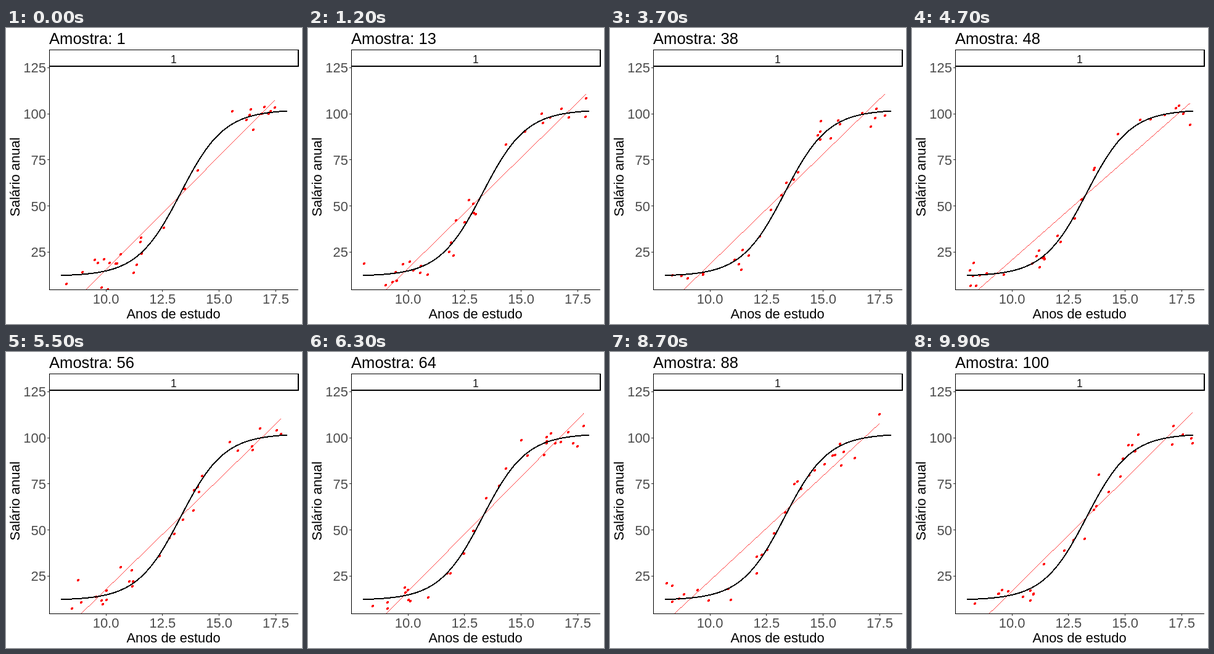
Write an HTML page that moves like this. It is 480 px wide and 480 px high and loops after 10 s.

```html
<!DOCTYPE html>
<html lang="pt">
<head>
<meta charset="utf-8">
<style>
  html, body { margin: 0; width: 100%; height: 100%; overflow: hidden; background: #fff; }
  svg { display: block; width: 100vw; height: 100vh; font-family: "Liberation Sans", Arial, sans-serif; }
  path, circle { shape-rendering: crispEdges; }
</style>
</head>
<body>
<svg viewBox="0 0 480 480">
  <defs><clipPath id="panel"><rect x="70" y="62" width="404" height="362"/></clipPath></defs>
  <text id="title" x="70" y="26" font-size="25.6"></text>
  <g clip-path="url(#panel)">
    <g id="dots" fill="#f00"></g>
    <path id="fit" fill="none" stroke="#f00" stroke-width="0.74"/>
    <path id="curve" fill="none" stroke="#000" stroke-width="2"/>
  </g>
  <path d="M70 35.5H474M70.5 35V424M70 424.5H474" fill="none" stroke="#000"/>
  <path d="M70 62H475M474 35V63" fill="none" stroke="#000" stroke-width="2"/>
  <text x="272" y="57" font-size="17.6" fill="#1a1a1a" text-anchor="middle">1</text>
  <path id="ticks" stroke="#333"/>
  <g id="labels" font-size="22" fill="#4d4d4d"></g>
  <text x="271.5" y="471" font-size="21.9" text-anchor="middle">Anos de estudo</text>
  <text transform="translate(22 241.5) rotate(-90)" font-size="22" text-anchor="middle">Salário anual</text>
</svg>
<script>
const STEP = 100, SAMPLES = 100, SIZE = 29, NOISE = 4.6;
const MIN_X = 8, MAX_X = 18;
const $ = id => document.getElementById(id);
const px = x => 88.6 + (x - MIN_X) * 36.73;
const py = y => 438.22 - y * 2.99;
const salary = x => 12 + 90.2 / (1 + Math.exp(-1.04 * (x - 13.3)));

function random(seed) {
  let s = Math.imul(seed, 0x9e3779b9);
  return () => {
    s = s + 0x6d2b79f5 | 0;
    let t = Math.imul(s ^ s >>> 15, 1 | s);
    t = t + Math.imul(t ^ t >>> 7, 61 | t) ^ t;
    return ((t ^ t >>> 14) >>> 0) / 4294967296;
  };
}

function drawSample(n) {
  const rnd = random(n);
  const normal = () => Math.sqrt(-2 * Math.log(1 - rnd())) * Math.cos(2 * Math.PI * rnd());
  return Array.from({ length: SIZE }, () => {
    const x = MIN_X + (MAX_X - MIN_X) * rnd();
    return [x, salary(x) + NOISE * normal()];
  });
}

// Least-squares line, drawn only across the range of the sample.
function fitLine(points) {
  const mean = i => points.reduce((sum, p) => sum + p[i], 0) / points.length;
  const mx = mean(0), my = mean(1);
  let sxy = 0, sxx = 0;
  for (const [x, y] of points) {
    sxy += (x - mx) * (y - my);
    sxx += (x - mx) ** 2;
  }
  const xs = points.map(p => p[0]);
  return [Math.min(...xs), Math.max(...xs)].map(x => [x, my + sxy / sxx * (x - mx)]);
}

const toPath = points => "M" + points.map(([x, y]) => `${px(x).toFixed(2)} ${py(y).toFixed(2)}`).join("L");
const toDot = ([x, y]) => `<circle cx="${Math.round(px(x))}" cy="${Math.round(py(y))}" r="2"/>`;
const label = (x, y, text, anchor) => `<text x="${x}" y="${y}" text-anchor="${anchor}">${text}</text>`;

function buildAxes() {
  let ticks = "", labels = "";
  for (let x = 10; x <= 17.5; x += 2.5) {
    ticks += `M${Math.floor(px(x)) + 0.5} 425v3`;
    labels += label(px(x), 447, x.toFixed(1), "middle");
  }
  for (let y = 25; y <= 125; y += 25) {
    ticks += `M67 ${Math.floor(py(y)) + 0.5}h3`;
    labels += label(65, py(y) + 8, y, "end");
  }
  $("ticks").setAttribute("d", ticks);
  $("labels").innerHTML = labels;
}

function buildCurve() {
  const points = Array.from({ length: 101 }, (_, i) => {
    const x = MIN_X + i / 10;
    return [x, salary(x)];
  });
  $("curve").setAttribute("d", toPath(points));
}

let shown = 0;
function render(time) {
  const n = Math.floor(time / STEP) % SAMPLES + 1;
  if (n === shown) return;
  shown = n;
  const points = drawSample(n);
  $("title").textContent = `Amostra: ${n}`;
  $("dots").innerHTML = points.map(toDot).join("");
  $("fit").setAttribute("d", toPath(fitLine(points)));
}

buildAxes();
buildCurve();
render(0);
const start = performance.now();
(function loop() {
  render(performance.now() - start);
  requestAnimationFrame(loop);
})();
</script>
</body>
</html>
```
